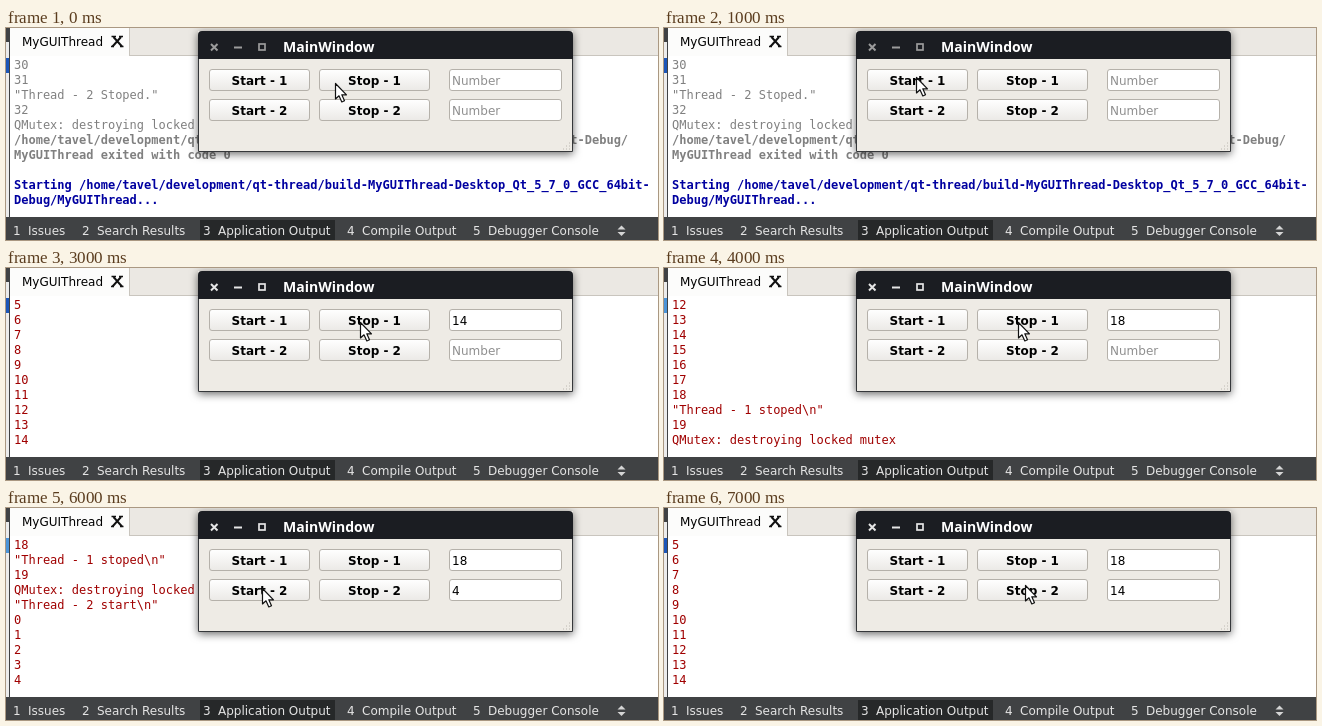
Recreate the animation shown at these times as an HTML page. Size 652x212 px, loop 8 s.

```html
<!DOCTYPE html>
<html lang="en">
<head>
<meta charset="utf-8">
<title>Thread demo</title>
<style>
  html, body { margin: 0; width: 100%; height: 100%; overflow: hidden; background: #fff; }
  svg { display: block; width: 652px; height: 212px; font: 12px "DejaVu Sans", sans-serif; }
  #log { font-family: "DejaVu Sans Mono", monospace; }
  .old { fill: #808080; }
  .note { fill: #808080; font-weight: bold; }
  .run { fill: #0000a0; font-weight: bold; }
  .err { fill: #a00000; }
  .title { font: bold 14px "Open Sans", sans-serif; fill: #fff; }
  .button { font-weight: bold; text-anchor: middle; fill: #000; }
  .hint { fill: #8f8f8f; }
  .bar { fill: #e4e4e4; }
  .frame { filter: drop-shadow(0 2px 4px #0009); }
</style>
</head>
<body>
<svg viewBox="0 0 652 212">
  <defs>
    <linearGradient id="face" x2="0" y2="1">
      <stop stop-color="#fff"/><stop offset="1" stop-color="#ebe9e6"/>
    </linearGradient>
  </defs>

  <rect width="652" height="212" fill="#fff"/>
  <rect width="652" height="27" fill="#ebe8e3"/>
  <path d="M124 27.5H652" stroke="#c9c5be"/>
  <path d="M4 0H123V28H4Z" fill="#fcfcfb"/>
  <path d="M123.5 0V28" stroke="#c9c5be"/>
  <rect width="3" height="189" fill="#ececec"/>
  <rect width="3" height="14" fill="#404244"/>
  <rect id="mark" y="30" width="3" height="15"/>
  <path d="M3.5 0V189" stroke="#404244"/>
  <text x="16" y="18">MyGUIThread</text>
  <path d="M106.500 18.500L115 9M107.500 9L116 18.500" stroke="#111" stroke-width="2"/>
  <path d="M105.500 8.500H110M113 8.500H117M105 18.500H108M114 18.500H117.500" stroke="#111" stroke-width="1.500"/>

  <g id="log"></g>

  <g id="panes">
    <rect y="189" width="652" height="23" fill="#404244"/>
    <rect x="194" y="192" width="135" height="20" fill="#262829"/>
    <path d="M611.500 201.500L615.500 197.500L619.500 201.500ZM611.500 204L615.500 208L619.500 204Z" fill="#d5d5d5"/>
  </g>

  <g class="frame">
    <rect x="192" y="3" width="375" height="121" fill="#eeebe5"/>
  </g>
  <path d="M192 31V7Q192 3 196 3H563Q567 3 567 7V31Z" fill="#1b1d22"/>
  <path d="M192.500 31V123.500H566.500V31" fill="none" stroke="#35373a"/>
  <g id="controls" fill="none" stroke-width="2">
    <path d="M205 16L211.500 22.500M211.500 16L205 22.500M228 19.500H236"/>
    <rect x="253" y="16" width="6" height="6" stroke-width="1.700"/>
  </g>
  <text class="title" x="277" y="24">MainWindow</text>
  <path d="M557 121H565M560 118H565M563 115H565" stroke="#bcb8b1" stroke-dasharray="1 2"/>
  <g id="form"></g>

  <path id="cursor" d="M.5 .5V16L4 12.800L6.800 19L9.500 17.800L6.800 11.800H11.500Z"
        fill="#fff" stroke="#111" stroke-width="1.200" stroke-linejoin="round"/>
</svg>
<script>
  const $ = id => document.getElementById(id);

  function add(parent, tag, attrs, text = "") {
    const el = document.createElementNS("http://www.w3.org/2000/svg", tag);
    for (const key in attrs) el.setAttribute(key, attrs[key]);
    el.textContent = text;
    return parent.appendChild(el);
  }

  const project = "/home/tavel/development/qt-thread/build-MyGUIThread-Desktop_Qt_5_7_0_GCC_64bit-";
  const locked = "QMutex: destroying locked mutex";
  const lines = [];
  const put = (style, ...texts) => texts.forEach(text => lines.push({ style, text }));
  const count = last => { for (let i = 0; i <= last; i++) put("err", i); };

  put("old", "30", "31", '"Thread - 2 Stoped."', "32", locked);
  put("note", project + "Debug/", "MyGUIThread exited with code 0", "");
  put("run", "Starting " + project, "Debug/MyGUIThread...");
  put("err", '"Thread - 1 start\\n"');
  count(18);
  put("err", '"Thread - 1 stoped\\n"', "19", locked, '"Thread - 2 start\\n"');
  count(14);

  // One step per second: last visible line, cursor tip, field values
  const steps = [
    { end: 10, at: [329, 55], values: ["", ""] },
    { end: 10, at: [252, 49], values: ["", ""] },
    { end: 16, at: [256, 50], values: ["4", ""] },
    { end: 26, at: [354, 54], values: ["14", ""] },
    { end: 33, at: [354, 54], values: ["18", ""] },
    { end: 33, at: [300, 66], values: ["18", ""] },
    { end: 39, at: [256, 80], values: ["18", "4"] },
    { end: 49, at: [361, 77], values: ["18", "14"] }
  ];

  const rows = Array.from({ length: 10 }, (_, i) => add($("log"), "text", { x: 8, y: 41 + 15 * i }));

  function box(x, y, width, fill) {
    add($("form"), "rect", { x: x + .5, y: y + .5, width: width - 1, height: 21, rx: 2.5, fill, stroke: "#b5b1aa" });
  }

  function button(x, y, width, label) {
    box(x, y, width, "url(#face)");
    add($("form"), "text", { class: "button", x: x + width / 2, y: y + 16 }, label);
  }

  const fields = [1, 2].map(n => {
    const y = 11 + 30 * n;
    button(203, y, 101, "Start - " + n);
    button(313, y, 111, "Stop - " + n);
    box(443, y, 113, "#fff");
    return add($("form"), "text", { x: 446, y: y + 16 });
  });

  const tabs = { 7: "Issues", 76: "Search Results", 197: "Application Output", 341: "Compile Output", 467: "Debugger Console" };
  Object.entries(tabs).forEach(([x, name], i) => {
    add($("panes"), "text", { class: "bar", x, y: 207 }, i + 1);
    add($("panes"), "text", { class: "bar", x: +x + 15, y: 207 }, name);
  });

  function show(index) {
    const { end, at, values } = steps[index];
    rows.forEach((row, i) => {
      const line = lines[end - 10 + i];
      row.setAttribute("class", line.style);
      row.textContent = line.text;
    });
    fields.forEach((field, i) => {
      field.textContent = values[i] || "Number";
      field.setAttribute("class", values[i] ? "" : "hint");
    });
    $("cursor").setAttribute("transform", `translate(${at})`);
    $("controls").setAttribute("stroke", index < 2 ? "#9c9c9c" : "#e6e6e6");
    $("mark").setAttribute("fill", [2, 4, 5, 6].includes(index) ? "#4b94d8" : "#1c56b8");
  }

  let shown = -1;
  function tick() {
    const index = Math.floor(performance.now() / 1000) % steps.length;
    if (index !== shown) show(shown = index);
    requestAnimationFrame(tick);
  }
  tick();
</script>
</body>
</html>
```
